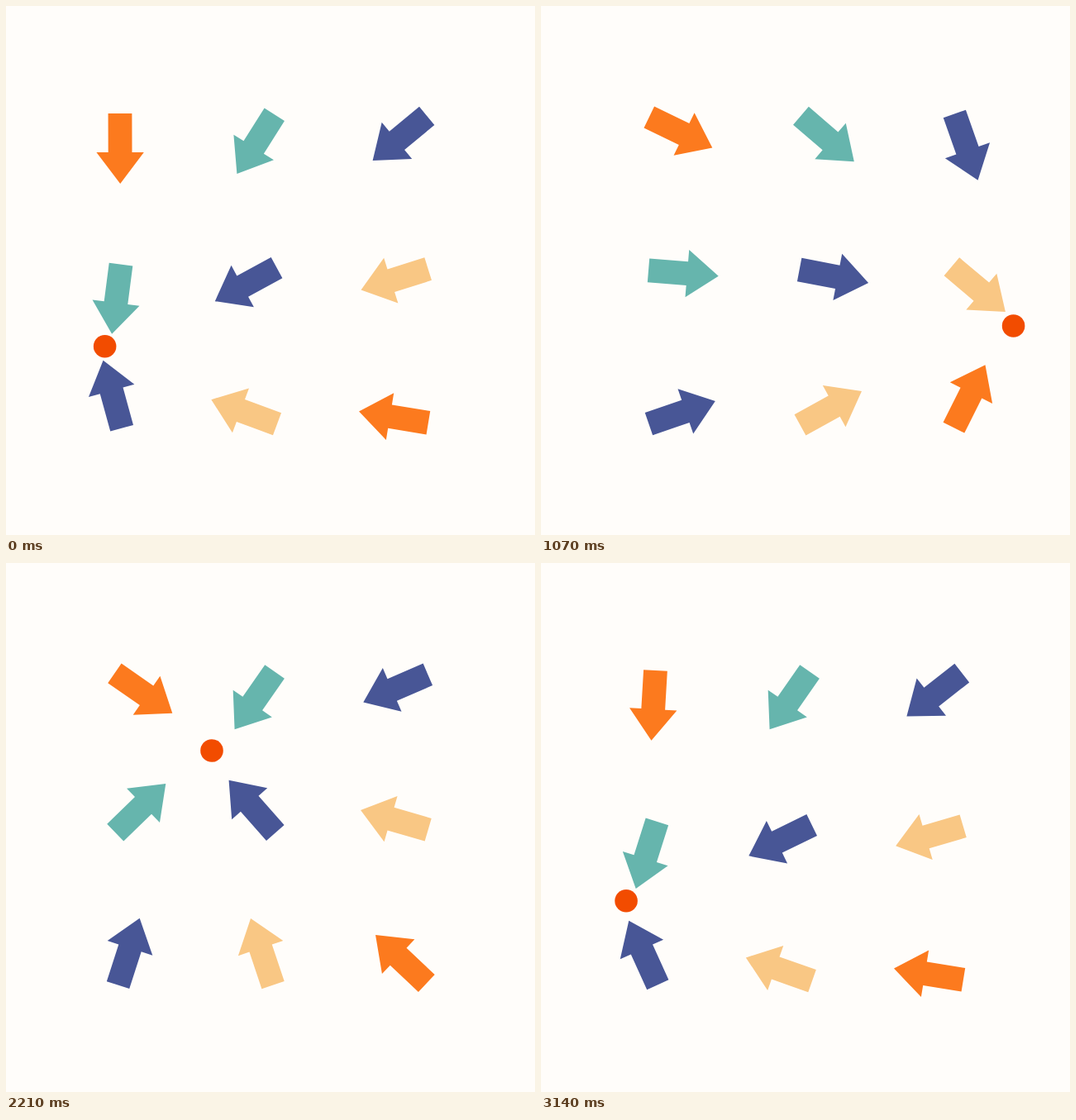
Animation of 640x640 px, one loop 3.21 s. Source, as an HTML page without scripts:

```html
<!DOCTYPE html>
<html lang="en">
<head>
<meta charset="utf-8">
<title>Arrows following a dot</title>
<style>
@property --f {
  syntax: "<number>";
  inherits: true;
  initial-value: 0;
}
html, body {
  margin: 0;
  width: 100%;
  height: 100%;
  overflow: hidden;
  background: #fffdfa;
}
/* --f counts 45 ticks per lap of a rounded track */
svg {
  display: block;
  width: 100%;
  height: 100%;
  animation: lap 3210ms steps(45) -4ms infinite;

  /* progress along the bottom and top edges, 0 to 1 */
  --b: clamp(0, (var(--f) - .27) / 12.53, 1);
  --t: clamp(0, (var(--f) - 22.44) / 12.76, 1);
  --go: (var(--b) + .03 * var(--b) * (1 - var(--b)));
  --back: (var(--t) + .06 * var(--t) * (1 - var(--t)));
  --side: (var(--go) - var(--back));

  /* turn around the right and left ends */
  --turn: (min(0, (var(--f) - .27) * 19.3)
    + 180 * clamp(0, (var(--f) - 12.8) / 9.64, 1)
    + 180 * clamp(0, (var(--f) - 35.2) / 9.64, 1));
  --a: calc(var(--turn) * 1deg);

  --x: calc(128 + 383 * var(--side) + 92.2 * sin(var(--a)));
  --y: calc(320 - 2.5 * var(--side) + 92.2 * cos(var(--a)));
}
@keyframes lap {
  from { --f: 0; }
  to { --f: 45; }
}
.dot {
  fill: #f24c00;
  transform: translate(calc(var(--x) * 1px), calc(var(--y) * 1px));
}
.arrow {
  transform:
    translate(calc(var(--u) * 1px), calc(var(--v) * 1px))
    rotate(calc(atan2(var(--y) - var(--v), var(--x) - var(--u)) - 4deg));
}
.c1 { --u: 138; }
.c2 { --u: 320.5; }
.c3 { --u: 503; }
.r1 { --v: 138; }
.r2 { --v: 320.5; }
.r3 { --v: 503; }
.orange { fill: #fc7a1e; }
.teal { fill: #66b5ad; }
.navy { fill: #485696; }
.sand { fill: #f9c784; }
</style>
</head>
<body>
<svg viewBox="0 0 640 640">
  <defs>
    <path id="arrow" d="M-8-14.4H39V-28.7L77 0 39 28.7V14.4H-8Z"/>
  </defs>
  <g class="r1">
    <use href="#arrow" class="arrow c1 orange"/>
    <use href="#arrow" class="arrow c2 teal"/>
    <use href="#arrow" class="arrow c3 navy"/>
  </g>
  <g class="r2">
    <use href="#arrow" class="arrow c1 teal"/>
    <use href="#arrow" class="arrow c2 navy"/>
    <use href="#arrow" class="arrow c3 sand"/>
  </g>
  <g class="r3">
    <use href="#arrow" class="arrow c1 navy"/>
    <use href="#arrow" class="arrow c2 sand"/>
    <use href="#arrow" class="arrow c3 orange"/>
  </g>
  <circle class="dot" r="13.8"/>
</svg>
</body>
</html>
```
